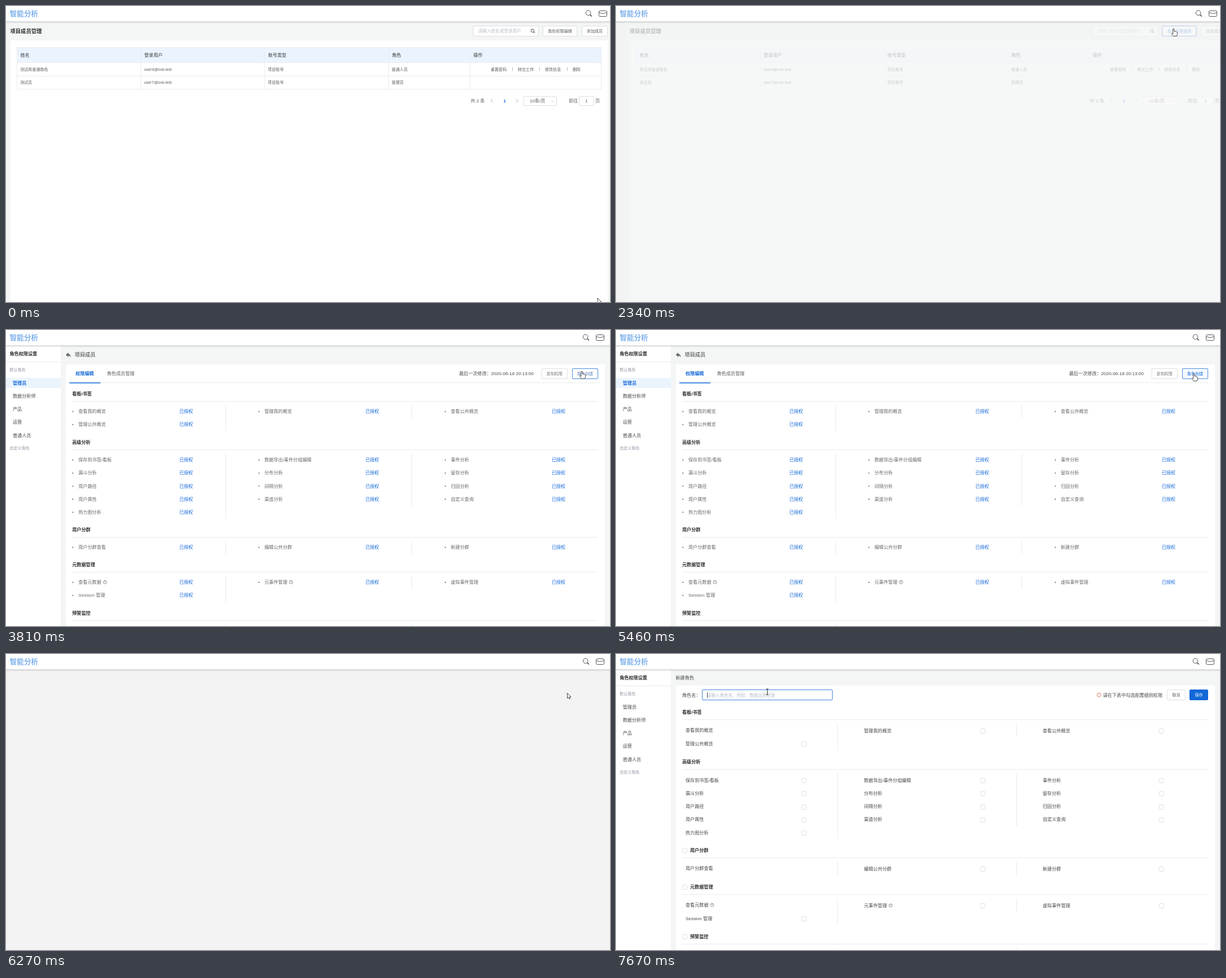
These frames come from a looping animation (1068x525 px, 8 s). An HTML page with a canvas:

```html
<!DOCTYPE html>
<html lang="zh-CN">
<head>
<meta charset="utf-8">
<title>角色权限</title>
<style>
html, body { margin: 0; width: 100%; height: 100%; overflow: hidden; background: #f3f3f3; }
canvas { display: block; }
</style>
</head>
<body>
<canvas id="stage" width="1068" height="525"></canvas>
<script>
const ctx = document.getElementById('stage').getContext('2d');
const LOOP = 8000, FADE = 250, SHIFT = 30;
const BACK = '#f3f3f3', BASE = '#f4f5f5', BLUE = '#1268d8', INK = '#2b2d30', TEXT = '#5b5d61',
  PALE = '#b9bdc5', EDGE = '#dcdfe4', LINE = '#e9ebef';
const SANS = '"Liberation Sans","Noto Sans CJK SC","Noto Sans CJK",sans-serif';

const SECTIONS = [
  ['看板/书签', '查看我的概览 管理我的概览 查看公共概览 管理公共概览'],
  ['高级分析', '保存到书签/看板 数据导出/事件分组编辑 事件分析 漏斗分析 分布分析 留存分析 用户路径 ' +
    '间隔分析 归因分析 用户属性 渠道分析 自定义查询 热力图分析'],
  ['用户分群', '用户分群查看 编辑公共分群 新建分群'],
  ['元数据管理', '查看元数据 元事件管理 虚拟事件管理 Session_管理'],
  ['预警监控', '']
].map(([title, items]) => ({ title, items: items ? items.split(' ').map(s => s.replace('_', ' ')) : [] }));
const ROLES = ['管理员', '数据分析师', '产品', '运营', '普通人员'];

// Pointer keys: time, x, y
const PATH = [[20, 1046, 518], [310, 1001, 455], [540, 1001, 455], [1330, 1034, 67], [1360, 1034.5, 61.5],
  [1700, 986, 40], [3590, 986, 40], [3810, 1018, 73], [3900, 1019, 74.5], [4130, 1019, 74.5], [4190, 1022, 77],
  [5990, 1022, 77], [6460, 976, 65], [6840, 976, 65], [7630, 267.5, 67]];

const clamp = v => Math.max(0, Math.min(1, v));
const within = (t, a, b) => t >= a && t < b;

// The CSS "ease" curve
function ease(p) {
  let lo = 0, hi = 1, u = .5;
  for (let i = 0; i < 18; i++) {
    u = (lo + hi) / 2;
    const x = .75 * u * (1 - u) + u ** 3;
    if (x < p) lo = u; else hi = u;
  }
  return .3 * u * (1 - u) ** 2 + 3 * u * u * (1 - u) + u ** 3;
}

function pointer(t) {
  let i = PATH.findIndex(k => k[0] > t);
  if (i === 0) return PATH[0].slice(1);
  if (i < 0) return PATH[PATH.length - 1].slice(1);
  const [t0, x0, y0] = PATH[i - 1], [t1, x1, y1] = PATH[i];
  const p = (t - t0) / (t1 - t0), s = p * p * (3 - 2 * p);
  const lift = t0 === 6840 ? 9 * Math.sin(Math.PI * s) : 0;
  return [x0 + (x1 - x0) * s, y0 + (y1 - y0) * s - lift];
}

function text(s, x, y, color = TEXT, size = 8.1, { weight = 400, align = 'left' } = {}) {
  ctx.font = `${weight} ${size}px ${SANS}`;
  ctx.textAlign = align;
  ctx.fillStyle = color;
  ctx.fillText(s, x, y + size * .37);
}
const bold = (s, x, y, color = INK, size = 8.1) => text(s, x, y, color, size, { weight: 700 });

function fill(x, y, w, h, color) {
  ctx.fillStyle = color;
  ctx.fillRect(x, y, w, h);
}
const hline = (x0, x1, y, color = LINE) => fill(x0, y, x1 - x0, 1, color);
const vline = (x, y0, y1, color = LINE) => fill(x, y0, 1, y1 - y0, color);

function box(x, y, w, h, edge = EDGE, color = '#fff', r = 1.5) {
  ctx.beginPath();
  ctx.roundRect(x + .5, y + .5, w - 1, h - 1, r);
  ctx.fillStyle = color;
  ctx.fill();
  ctx.lineWidth = 1;
  ctx.strokeStyle = edge;
  ctx.stroke();
}
function button(s, x, y, w, edge, color = TEXT, bg) {
  box(x, y, w, 19, edge, bg);
  text(s, x + w / 2, y + 9.5, color, 7.1, { align: 'center' });
}
function stroke(d, x, y, color, width = 1, bg) {
  ctx.save();
  ctx.translate(x, y);
  const path = new Path2D(d);
  if (bg) { ctx.fillStyle = bg; ctx.fill(path); }
  ctx.strokeStyle = color;
  ctx.lineWidth = width;
  ctx.lineJoin = 'round';
  ctx.stroke(path);
  ctx.restore();
}
function ring(x, y, r, color, mark) {
  ctx.beginPath();
  ctx.arc(x, y, r, 0, 7);
  ctx.strokeStyle = color;
  ctx.lineWidth = .8;
  ctx.stroke();
  text(mark, x, y, color, 5, { align: 'center' });
}
function lens(x, y, k, color) {
  ctx.beginPath();
  ctx.arc(x, y, 4.3 * k, 0, 7);
  ctx.strokeStyle = color;
  ctx.lineWidth = 1;
  ctx.stroke();
  stroke(`M${3.1 * k} ${3.1 * k}L${6.3 * k} ${6.3 * k}`, x, y, color, 1.5 * k + .2);
}

function header(dx) {
  fill(0, 0, 1068, 28, '#fff');
  const g = ctx.createLinearGradient(0, 27, 0, 31);
  g.addColorStop(0, 'rgba(0,0,0,.17)');
  g.addColorStop(1, 'rgba(0,0,0,0)');
  fill(0, 27, 1068, 4, g);
  bold('智能分析', 6.5, 13, '#80b2ec', 12.6);
  lens(1029.6 + dx, 12.2, 1, '#505050');
  box(1048 + dx, 8, 15, 11, '#555', '#fff', 2);
  stroke('M0 0Q7 5 14 0', 1048.5 + dx, 11, '#555');
}

function membersPage(t, [, py]) {
  fill(0, 28, 1068, 497, BASE);
  fill(8, 61, 1056, 464, '#fff');
  bold('项目成员管理', 7.5, 44.5, INK, 9.3);
  box(826, 35, 116, 19);
  text('请输入姓名或登录用户', 835, 44.5, PALE, 7.6);
  lens(931, 43.8, .65, '#555');
  const hot = t > 1560;
  button('角色权限编辑', 949, 35, 61, hot ? BLUE : EDGE, hot ? BLUE : TEXT);
  button('添加成员', 1018, 35, 46);

  fill(19, 73, 1033, 28, '#ebf4fe');
  const columns = [19, 238, 457, 676, 820];
  const rows = [['测试用普通角色', 'user4@ovk.test', '项目账号', '普通人员'],
    ['测试员', 'user7@ovk.test', '项目账号', '管理员']];
  ['姓名', '登录用户', '账号类型', '角色', '操作'].forEach((s, i) => text(s, columns[i] + 6.5, 87, '#33363b'));
  rows.forEach((row, r) => {
    const y = 101 + r * 23;
    if (t > 540 && t < 1330 && py >= y && py < y + 23) fill(19, y, 1033, 23, '#fafbfd');
    row.forEach((s, i) => text(s, columns[i] + 6, y + 11, TEXT, 7.05));
  });
  [73, 100, 124, 147].forEach(y => hline(19, 1053, y));
  [...columns, 1052].forEach(x => vline(x, 73, 148));
  [['重置密码', 857], ['转交工作', 905], ['修改信息', 953], ['删除', 1002]].forEach(([s, x], i) => {
    text(s, x, 112, TEXT, 7.05);
    if (i) vline(x - 10, 109, 115, '#b5b7bb');
  });

  text('共 2 条', 821.5, 168);
  stroke('M1.5 -3L-1.5 0L1.5 3', 859, 168, '#999', .8);
  text('1', 881.7, 168, BLUE, 8, { weight: 700, align: 'center' });
  stroke('M-1.5 -3L1.5 0L-1.5 3', 904, 168, '#999', .8);
  box(915, 160, 59, 17);
  text('10条/页', 926, 168.5);
  stroke('M-2 -1L0 1L2 -1', 966, 169, PALE, .8);
  text('前往', 995, 168.5);
  box(1013, 160, 27, 17);
  text('1', 1026.3, 168.5, TEXT, 8, { align: 'center' });
  text('页', 1042, 168.5);
}

function sidebar(loaded, active) {
  fill(0, 28, 97, 497, '#fff');
  bold('角色权限设置', 6.5, 42);
  hline(0, 97, 56);
  text('默认角色', 6.5, 70.5, '#8f96a3', 7);
  if (loaded) {
    if (active) fill(0, 85, 97, 18, '#ebf4fd');
    ROLES.forEach((s, i) => {
      const on = active && i === 0;
      text(s, 12, 94 + i * 23.15, on ? BLUE : '#45474b', 8.1, { weight: on ? 700 : 400 });
    });
  }
  text('自定义角色', 6.5, loaded ? 209.5 : 94, '#8f96a3', 7);
}

// Section grid shared by the viewing page and the form
function grid(tops, { left, lead, dividers, gap, draw, titleX }) {
  SECTIONS.forEach(({ title, items }, n) => {
    const top = tops[n];
    bold(title, titleX(n, top), top);
    hline(117, 1047, top + 13);
    dividers.forEach((x, c) => {
      const count = items.length ? Math.ceil((items.length - c) / 3) : 3;
      vline(x, top + 20, top + 20 + count * 23.2 + gap);
    });
    items.forEach((s, i) => {
      const c = i % 3, y = top + lead + Math.floor(i / 3) * 23.15;
      draw(s, left[c], y, c, n, i);
      if (n === 3 && i < 2) ring(left[c] + 47, y - (gap && !i ? .7 : 0), 2.9, '#777', '?');
    });
  });
}

function rightsPage(t) {
  const loaded = t > 3100, hot = t > 3720, pressed = t > 4800;
  fill(0, 28, 1068, 497, BASE);
  sidebar(loaded, true);
  fill(106, 61, 953, 464, '#fff');
  stroke('M0 0L4 -3.5V-1.3Q8 -1.3 8 3.5Q7 1.2 4 1.2V3.4Z', 106, 44, '#666', .5, '#666');
  text('项目成员', 121.5, 44, '#333', 9.2, { weight: 500 });
  bold('权限编辑', 123, 77, BLUE);
  text('角色成员管理', 178.5, 77);
  hline(112, 1047, 93);
  hline(112, 167, 93, BLUE);
  fill(112, 94, 55, .5, BLUE);
  text('最后一次修改：' + (loaded ? '2020-06-18 20:13:00' : ''), 933, 77.5, '#45474b', 8.1, { align: 'right' });
  button('复制权限', 947, 68, 46, EDGE, '#77797d');
  button('角色创建', 1001, 68, 46, hot ? '#4a8be0' : EDGE,
    pressed ? BLUE : hot ? '#5c80b0' : '#77797d', pressed ? '#f6faff' : '#fff');
  grid([113, 199, 354, 416, 502], {
    left: [128, 457, 786.5], lead: 31.3, dividers: [388, 717], gap: 0, titleX: () => 117,
    draw(s, x, y) {
      ctx.beginPath();
      ctx.arc(x - 9.8, y + .4, 1.1, 0, 7);
      ctx.fillStyle = '#777';
      ctx.fill();
      text(s, x, y, '#66686c');
      text('已授权', x + 178.4, y, BLUE, 8.1, { weight: 500 });
    }
  });
}

const check = (x, y) => box(Math.round(x - 4), Math.round(y - 4), 9, 9, '#dcdfe6', '#fff', 1);

function formPage(t) {
  const focus = t >= 7650;
  fill(0, 28, 1068, 497, BASE);
  sidebar(true, false);
  fill(106, 56, 953, 469, '#fff');
  text('新建角色', 105.5, 42, '#45474b');
  text('角色名：', 117, 73, '#45474b');
  box(152, 63, 231, 19, focus ? '#3f86de' : EDGE);
  text('请输入角色名，例如：数据运营经理', 161, 73, PALE, 7.5);
  if (focus) vline(161, 68, 78, '#555');
  ring(854, 72.5, 3.4, '#cf5f45', '!');
  text('请在下表中勾选配置细则权限', 861, 72.8, '#45474b');
  button('取消', 974, 63, 33);
  button('保存', 1014, 63, 33, BLUE, '#fff', BLUE);
  grid([103, 191, 348, 413, 501], {
    left: [123, 438.5, 754.5], lead: 33, dividers: [391, 708], gap: 1.2,
    titleX(n, y) {
      if (n < 2) return 117;
      check(121, y);
      return 131;
    },
    draw(s, x, y, c, n, i) {
      const fixed = i === 0 && n !== 1;
      text(s, x, fixed ? y - .7 : y, '#45474b');
      if (!fixed) check(332.4 + c * 316, y + .3);
    }
  });
}

// Pages: drawing function, time in, time out
const PAGES = [[membersPage, -1000, 2260], [rightsPage, 2870, 5660], [formPage, 6270, 9999]];

const ARROW = 'M0 0V9.4L2.2 7.4L3.7 10.6L5.1 10L3.7 7H6.6Z';
const HAND = 'M-1.1 9V1Q0 -1 1.1 1V5Q2.4 4.3 3 5.5Q4.4 4.9 4.9 6.2Q6.5 5.8 6.5 7.5V10.3L5.2 13.5H-.2' +
  'L-3.6 9.3Q-3.6 7.4 -1.1 9Z';
const BEAM = 'M-2.2 -5H2.2M0 -5V5M-2.2 5H2.2';

function cursor(t, [x, y]) {
  const hand = within(t, 1560, 2510) || within(t, 3740, 5910) || within(t, 6380, 6880);
  if (t > 6880 && x < 383) stroke(BEAM, x, y, '#333');
  else stroke(hand ? HAND : ARROW, x, y, '#333', .9, '#fff');
}

function render(now) {
  const t = now % LOOP, at = pointer(t);
  fill(0, 0, 1068, 525, BACK);
  let scrolled = false;
  for (const [draw, from, to] of PAGES) {
    if (!within(t, from, to + FADE)) continue;
    const enter = ease(clamp((t - from) / FADE)), leave = ease(clamp((t - to) / FADE));
    ctx.save();
    // Nested fades make the page fainter than its slide suggests
    ctx.globalAlpha = (enter * (1 - leave)) ** 1.65;
    ctx.translate(SHIFT * (enter - 1 + leave), 0);
    draw(t, at);
    ctx.restore();
    scrolled = draw !== membersPage;
  }
  header(scrolled ? -5 : 0);
  cursor(t, at);
}

let start;
function frame(now) {
  start ??= now;
  render(now - start);
  requestAnimationFrame(frame);
}
requestAnimationFrame(frame);
</script>
</body>
</html>
```
